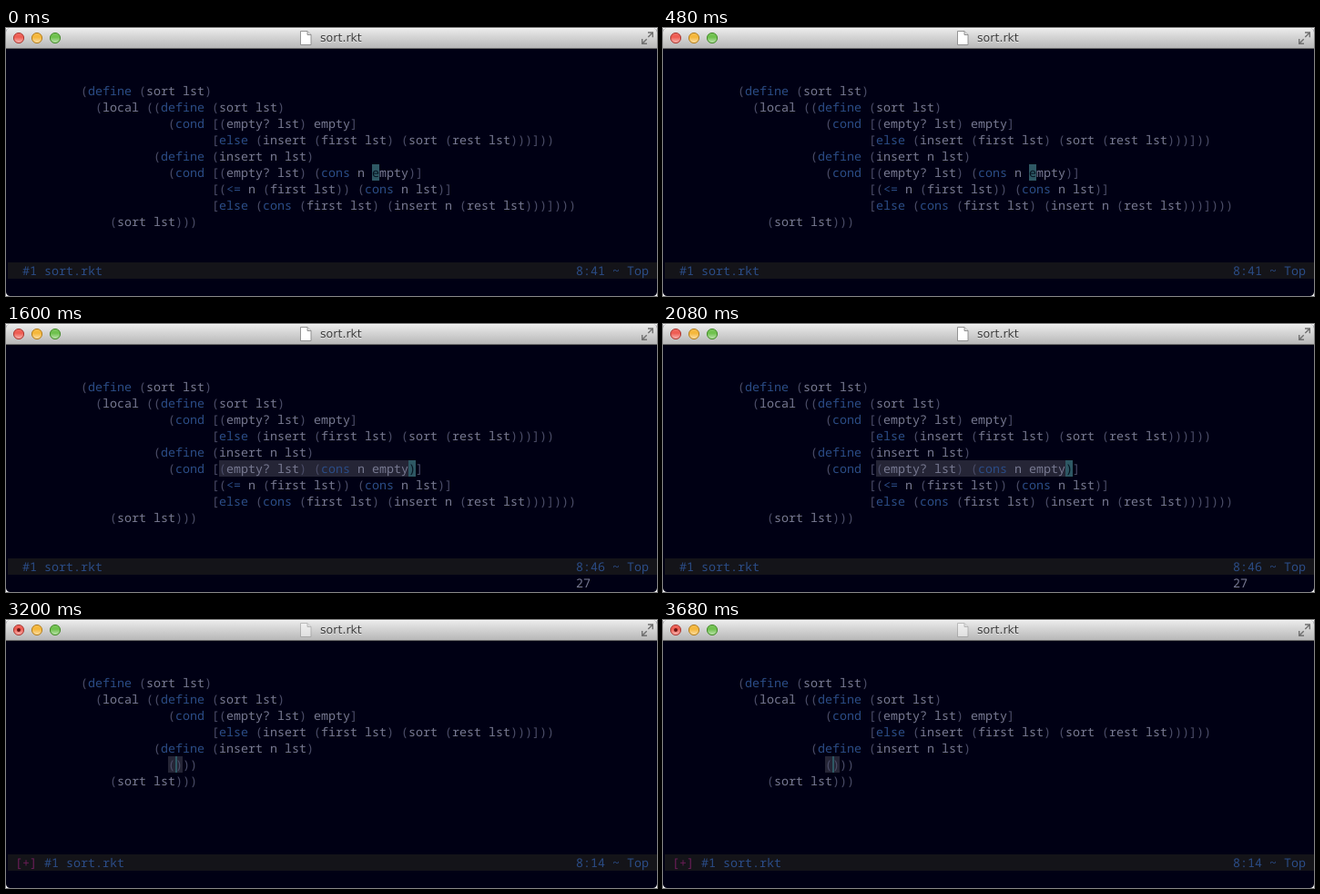
These frames come from a looping animation (715 by 295 pixels, 4000 ms). An HTML page:

```html
<!DOCTYPE html>
<html lang="en">
<head>
<meta charset="utf-8">
<title>Editor</title>
<style>
html, body { margin: 0; width: 100%; height: 100%; overflow: hidden; background: #fff; }
svg { display: block; width: 100%; height: 100%; }
text { white-space: pre; text-rendering: geometricPrecision; }
.mono { font: 13.333px "Noto Sans Mono", monospace; }
.title { font: 12.6px "DejaVu Sans", sans-serif; }
</style>
</head>
<body>
<svg viewBox="0 0 715 295">
  <defs>
    <linearGradient id="bar" x2="0" y2="1">
      <stop stop-color="#ececec"/><stop offset="1" stop-color="#b5b5b5"/>
    </linearGradient>
    <linearGradient id="shine" x2="0" y2="1">
      <stop stop-color="#fff" stop-opacity=".1"/>
      <stop offset=".4" stop-color="#fff" stop-opacity="0"/>
      <stop offset="1" stop-color="#fff" stop-opacity=".55"/>
    </linearGradient>
    <clipPath id="win"><rect width="715" height="295" rx="4.5"/></clipPath>
  </defs>
  <g clip-path="url(#win)">
    <rect width="715" height="295" fill="#000014"/>
    <rect width="715" height="23" fill="url(#bar)"/>
    <path d="M0 .5H715" stroke="#f6f6f6"/>
    <path d="M0 22.5H715" stroke="#686868"/>
    <g id="lights"></g>
    <circle id="dirty" cx="14" cy="11" r="2" fill="#6b1512"/>
    <g id="doc" stroke="#8a8a8a" stroke-width=".9">
      <path d="M323.5 3.5H331L335 7.5V18.5H323.5Z" fill="#fff"/>
      <path d="M331 3.5V7.5H335" fill="#ddd"/>
    </g>
    <text class="title" x="345" y="16" fill="#fff" opacity=".6">sort.rkt</text>
    <text class="title" x="345" y="15" fill="#3c3c3c">sort.rkt</text>
    <g fill="none" stroke="#707070" stroke-width="1.4">
      <path d="M705 5H710.3V10.3M710 5.3L705.3 10M698.7 12V17.3H704M699 17L703.7 12.3"/>
    </g>
    <rect x="2" y="258" width="713" height="18" fill="#141419"/>
    <g id="screen" class="mono"></g>
  </g>
</svg>
<script>
const NS = 'http://www.w3.org/2000/svg';
const CELL = 8, LINE = 18, LEFT = 82, TOP = 60, STEP = 800;
const PLAIN = '#777991', DIM = '#4b4d68', BLUE = '#2b4c86';
const PICK = '#252536', CURSOR = '#2e5864', DARK = '#061320', PLUS = '#6b1d58';
const KEYWORDS = ['define', 'cond', 'else', 'cons', '<='];

const head = [
  '(define (sort lst)',
  '  (local ((define (sort lst)',
  '            (cond [(empty? lst) empty]',
  '                  [else (insert (first lst) (sort (rest lst)))]))',
  '          (define (insert n lst)'
];
const body = [
  '            (cond [(empty? lst) (cons n empty)]',
  '                  [(<= n (first lst)) (cons n lst)]',
  '                  [else (cons (first lst) (insert n (rest lst)))])))'
];
const tail = '    (sort lst)))';
const full = [...head, ...body, tail];
const cut = [...head, '            ()))', tail];

// picks: [row, first column, end column]; cursor: [row, column]
const states = [
  { lines: full, picks: [], cursor: [5, 40], pos: '8:41' },
  { lines: full, picks: [[5, 33, 45]], cursor: [5, 44], pos: '8:45', count: '12' },
  { lines: full, picks: [[5, 19, 46]], cursor: [5, 45], pos: '8:46', count: '27' },
  { lines: full, picks: [[5, 13, 47], [6, 0, 51], [7, 0, 65]], cursor: [7, 64], pos: '10:65', count: '3' },
  { lines: cut, picks: [[5, 12, 14]], cursor: [5, 13], pos: '8:14', insert: true }
];

const $ = id => document.getElementById(id);
const screen = $('screen');

function add(parent, tag, attrs, content) {
  const el = document.createElementNS(NS, tag);
  for (const key in attrs) el.setAttribute(key, attrs[key]);
  if (content) el.textContent = content;
  parent.append(el);
}

const write = (x, y, fill, content) => add(screen, 'text', { x, y, fill }, content);
const block = (row, col, width, fill) =>
  add(screen, 'rect', { x: LEFT + col * CELL, y: TOP + row * LINE, width, height: LINE, fill });

function colorOf(token) {
  if (/[()[\]]/.test(token)) return DIM;
  return KEYWORDS.includes(token) ? BLUE : PLAIN;
}

function drawLine(line, row, cursorCol) {
  const y = TOP + row * LINE + 14;
  for (const { 0: token, index } of line.matchAll(/[()[\]]+|[^()[\]\s]+/g)) {
    const color = colorOf(token);
    const at = cursorCol - index;
    const put = (from, to, fill) => {
      if (to > from) write(LEFT + (index + from) * CELL, y, fill, token.slice(from, to));
    };
    if (at >= 0 && at < token.length) {
      put(0, at, color);
      put(at, at + 1, DARK);
      put(at + 1, token.length, color);
    } else put(0, token.length, color);
  }
}

function draw({ lines, picks, cursor, pos, count, insert }) {
  screen.replaceChildren();
  for (const [row, from, to] of picks) block(row, from, (to - from) * CELL, PICK);
  const [row, col] = cursor;
  block(row, col, insert ? 2 : CELL, CURSOR);
  lines.forEach((line, i) => drawLine(line, i, !insert && i === row ? col : -1));

  if (insert) write(10, 272, PLUS, '[+]');
  write(insert ? 42 : 18, 272, BLUE, '#1 sort.rkt');
  const place = pos + ' ~ Top';
  write(706 - place.length * CELL, 272, BLUE, place);
  if (count) write(626, 290, PLAIN, count);

  $('dirty').setAttribute('visibility', insert ? 'visible' : 'hidden');
  $('doc').setAttribute('opacity', insert ? .5 : 1);
}

[['#ee5a50', '#a83a34'], ['#f5b638', '#b07d20'], ['#6cc04a', '#468a2c']].forEach(([fill, stroke], i) => {
  const spot = { cx: 14 + i * 20, cy: 11, r: 5.6 };
  add($('lights'), 'circle', { ...spot, fill, stroke });
  add($('lights'), 'circle', { ...spot, r: 5, fill: 'url(#shine)' });
});

let shown = -1;
function tick() {
  const now = Math.floor(performance.now() / STEP) % states.length;
  if (now !== shown) draw(states[shown = now]);
  requestAnimationFrame(tick);
}
tick();
</script>
</body>
</html>
```
